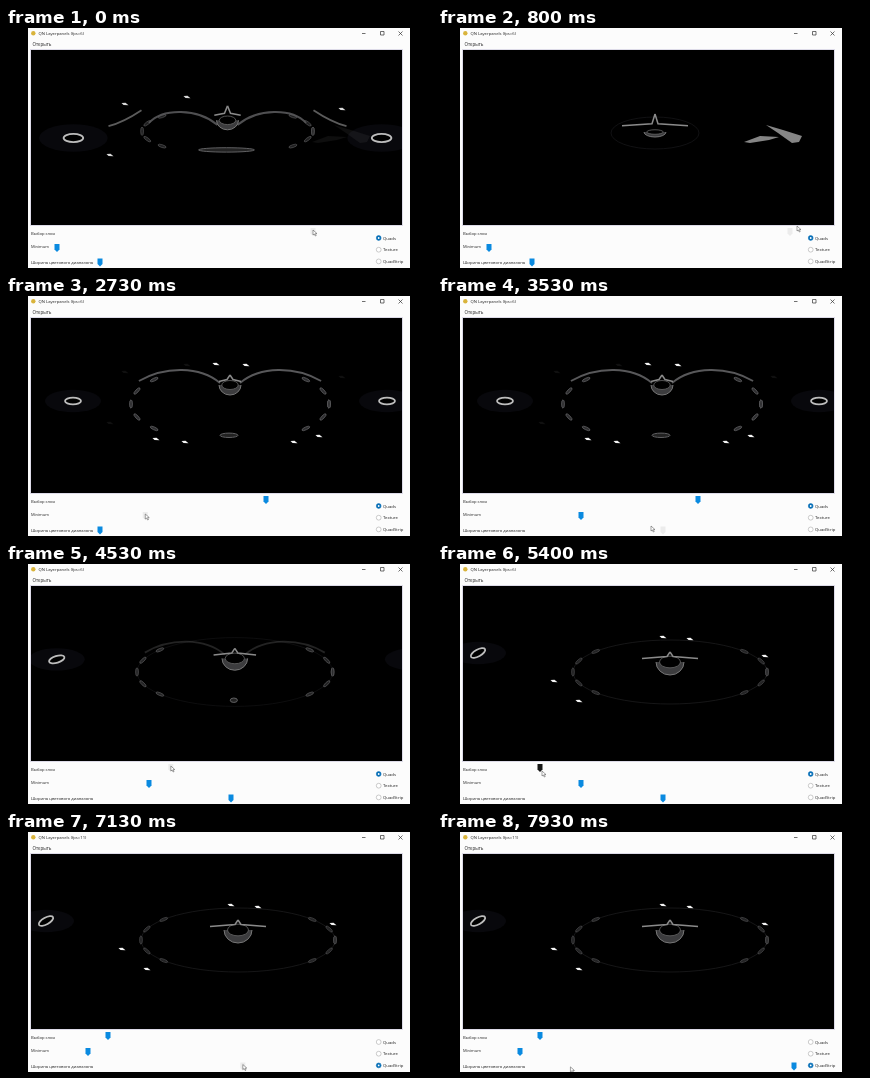
Write an HTML page with a canvas that moves like this. It is 426 px wide and 240 px high and loops after 8 s.

```html
<!DOCTYPE html>
<html lang="ru">
<head>
<meta charset="utf-8">
<style>
  html, body { margin: 0; width: 100%; height: 100%; overflow: hidden; background: #000; }
  canvas { display: block; width: 100vw; height: 100vh; }
</style>
</head>
<body>
<canvas id="stage" width="426" height="240"></canvas>
<script>
const ctx = document.getElementById('stage').getContext('2d');
const LOOP = 8000, STEP = 1000 / 15, RELEASE = 70;
const FONT = '"Open Sans", "Noto Sans", sans-serif';
const LAYER = 0, MINIMUM = 1, RANGE = 2;
const sliderTops = [200, 216, 230.5];
const SIDES = [-1, 1];

// Anatomy at four layer slider positions; every number is interpolated between them
const layers = [
  { at: 102, x: 232, chestY: 108, chestW: 97, chestH: 32, ribs: 0.65, arch: 0, outline: 1,
    spineY: 98, spineR: 14, depth: 13, spike: 10, wing: 28, sternum: 0,
    limbX: 40, limbY: 89, limbR: 8, tilt: -0.5, collar: 0, blade: 0,
    clips: [[225, 73], [252, 75], [116, 117], [141, 137], [327, 92]] },
  { at: 260, x: 224, chestY: 108, chestW: 99, chestH: 38, ribs: 1, arch: 1, outline: 0,
    spineY: 89, spineR: 11, depth: 10, spike: 10, wing: 11, sternum: 9,
    limbX: 67, limbY: 105, limbR: 8, tilt: 0, collar: 0, blade: 0,
    clips: [[210, 68], [240, 69], [150, 143], [179, 146], [288, 146], [313, 140]] },
  { at: 302, x: 222, chestY: 103, chestW: 90, chestH: 24, ribs: 0.8, arch: 1, outline: 0,
    spineY: 91, spineR: 11, depth: 10, spike: 14, wing: 11, sternum: 31,
    limbX: 76, limbY: 110, limbR: 10, tilt: 0, collar: 1, blade: 0,
    clips: [[119, 76], [181, 69], [336, 81], [104, 127]] },
  { at: 352, x: 217, chestY: 105, chestW: 44, chestH: 16, ribs: 0, arch: 0, outline: 0.8,
    spineY: 104, spineR: 11, depth: 5, spike: 18, wing: 33, sternum: 0,
    limbX: -10, limbY: 110, limbR: 8, tilt: 0, collar: 0, blade: 1,
    clips: [] }
];

const drag = (slider, start, end, from, to) => ({ slider, start, end, from, to });
const move = (time, x, y) => ({ stops: [{ time, x, y }] });

const actions = [
  drag(LAYER, 0, 780, 307, 352),
  move(800, 359, 198),
  drag(LAYER, 930, 1500, 352, 260),
  move(2000, 43, 224),
  drag(MINIMUM, 2250, 2800, 51, 143),
  drag(RANGE, 3050, 3480, 94, 225),
  move(3530, 213, 230),
  drag(LAYER, 4050, 4900, 260, 102),
  move(5400, 104, 207),
  move(5850, 372, 233),
  drag(MINIMUM, 6500, 6800, 143, 82),
  drag(RANGE, 7050, 7500, 225, 356),
  move(LOOP, 121, 235)
];

// A drag carries the pointer along with its thumb
const pointerStops = actions.flatMap(a => a.stops || [
  { time: a.start, x: a.from, y: sliderTops[a.slider] + 2 },
  { time: a.end, x: a.to, y: sliderTops[a.slider] + 2 }
]);

const clamp = v => Math.max(0, Math.min(1, v));
const mix = (a, b, k) => a + (b - a) * k;
const ease = (t, start, end) => {
  const k = clamp((t - start) / (end - start));
  return k * k * (3 - 2 * k);
};

function sliderAt(slider, t) {
  const own = actions.filter(a => a.slider === slider);
  const a = own.filter(d => d.start <= t).pop() || own[0];
  return { x: mix(a.from, a.to, ease(t, a.start, a.end)), held: t >= a.start && t < a.end + RELEASE };
}

function pointerAt(t) {
  const i = Math.max(1, pointerStops.findIndex(p => p.time >= t));
  const [a, b] = [pointerStops[i - 1], pointerStops[i]];
  const k = ease(t, a.time, b.time);
  return { x: mix(a.x, b.x, k), y: mix(a.y, b.y, k) };
}

function paint(path, fill, stroke, width = 1, alpha = 1) {
  ctx.globalAlpha = alpha;
  if (fill) {
    ctx.fillStyle = fill;
    ctx.fill(path);
  }
  if (stroke) {
    ctx.strokeStyle = stroke;
    ctx.lineWidth = width;
    ctx.stroke(path);
  }
  ctx.globalAlpha = 1;
}

const shape = d => new Path2D(d);

function ellipse(x, y, rx, ry, tilt = 0, from = 0, to = Math.PI * 2) {
  const path = new Path2D();
  path.ellipse(x, y, rx, ry, tilt, from, to);
  return path;
}

function rect(x, y, w, h, color) {
  ctx.fillStyle = color;
  ctx.fillRect(x, y, w, h);
}

function text(label, x, y, size = 4.3) {
  ctx.font = `${size}px ${FONT}`;
  ctx.fillStyle = '#222';
  ctx.fillText(label, x, y);
}

function bodyAt(position) {
  const next = Math.max(1, layers.findIndex(l => l.at >= position));
  const [a, b] = [layers[next - 1], layers[next]];
  const k = clamp((position - a.at) / (b.at - a.at));
  const body = {};
  for (const key in a) if (key !== 'clips') body[key] = mix(a[key], b[key], k);
  return body;
}

function drawRibs({ x, chestY, chestW, chestH, ribs, arch, outline }) {
  paint(ellipse(x, chestY, chestW, chestH), null, '#1c1c1e', 0.8, outline);
  for (let angle = 0; angle < Math.PI * 2; angle += Math.PI / 9) {
    const [c, s] = [Math.cos(angle), Math.sin(angle)];
    if (Math.abs(c) < 0.6) continue;
    const tangent = Math.atan2(chestH * c, -chestW * s);
    paint(ellipse(x + chestW * c, chestY + chestH * s, 4.2, 1.4, tangent), '#2c2c2e', '#606062', 0.8, ribs);
  }
  const top = chestY - chestH;
  for (const side of SIDES) {
    const at = distance => x + side * distance;
    paint(shape(`M${at(10)} ${top + 17}C${at(30)} ${top} ${at(65)} ${top} ${at(chestW * 0.92)} ${top + 15}`),
      null, '#58585a', 1.8, arch);
  }
}

function drawSpine({ x, spineY, spineR, depth, spike, wing }) {
  const tip = spineY - spike, root = spineY - spike * 0.35;
  paint(ellipse(x, spineY, spineR, depth, 0, 0, Math.PI), '#3c3c3e', '#777', 1);
  paint(ellipse(x, spineY, spineR * 0.75, depth * 0.45), '#000', '#666', 0.8);
  for (const side of SIDES) {
    paint(shape(`M${x} ${tip}L${x + side * 3} ${root - 2}L${x + side * wing} ${root}`), null, '#8a8a8a', 1.5);
  }
}

function drawLimbs({ x, limbX, limbY, limbR, tilt, collar, chestY }) {
  for (const side of SIDES) {
    const limb = x + side * (x - limbX);
    paint(ellipse(limb, limbY, limbR * 3.5, limbR * 1.4), '#08080c');
    paint(ellipse(limb, limbY, limbR, limbR * 0.42, tilt), '#000', '#bdbdbd', 1.8);
    paint(shape(`M${x + side * 119} ${chestY - 5}Q${x + side * 104} ${chestY - 9} ${x + side * 86} ${chestY - 21}`),
      null, '#666', 1.8, collar);
  }
}

function drawScan(position) {
  rect(24, 21, 373, 177, '#dddbe8');
  rect(25, 22, 371, 175, '#000');
  ctx.save();
  ctx.clip(ellipseFreeArea);
  const body = bodyAt(position);
  drawLimbs(body);
  drawRibs(body);
  drawSpine(body);
  if (body.sternum > 1) {
    paint(ellipse(body.x - 1, body.chestY + body.chestH * 0.85 - 1, body.sternum, 2.2), '#222', '#606062', 1);
  }
  paint(shape('M328 97L345 102L364 108L361 114L354 115L340 105ZM306 114L322 108L341 109L331 112L312 115Z'),
    '#858585', null, 0, body.blade);
  for (const { at, clips } of layers) {
    const strength = clamp(1 - Math.abs(position - at) / 45);
    for (const [x, y] of clips) {
      paint(shape(`M${x - 3.5} ${y - 1}l4 -.3l3 2.6l-5 -.3z`), '#f4f4f4', null, 0, strength);
    }
  }
  ctx.restore();
}
const ellipseFreeArea = shape('M25 22h371v175h-371z');

function drawThumb({ x, held }, top, pointer) {
  const hover = Math.abs(pointer.x - x) < 4 && pointer.y >= top && pointer.y < top + 8;
  const color = held ? '#ececec' : hover ? '#171717' : '#0a8ae0';
  paint(shape(`M${x - 2.5} ${top}h5v5.500l-2.500 2.500l-2.500 -2.500z`), color);
}

function drawRadio(label, y, selected) {
  const color = selected ? '#0870b8' : '#aaa';
  paint(ellipse(372.7, y, 2.4, 2.4), selected ? color : '#fff', color, 0.6);
  if (selected) paint(ellipse(372.7, y, 0.9, 0.9), '#fff');
  text(label, 377, y + 1.7);
}

function drawWindow(fps) {
  rect(0, 0, 426, 240, '#000');
  rect(22, 0, 382, 240, '#fcfcfc');
  paint(ellipse(27.3, 5.3, 2.2, 2.2), '#d9b43c');
  text(`QN Layerpanels (fps=${fps})`, 32.5, 7.2, 4.2);
  text('Открыть', 26.5, 17.8, 4.5);
  paint(shape('M356 5.500h3.500M374.500 3.500h3.500v3.500h-3.500zM392.500 3.500l4 4m0 -4l-4 4'), null, '#333', 0.7);
  text('Выбор слоя', 25, 207.3, 4.2);
  text('Minimum', 25, 220.3, 4);
  text('Ширина цветового диапазона', 25, 235.6, 4.2);
}

function drawPointer({ x, y }) {
  paint(shape(`M${x} ${y}v5l1.300 -1l1 2l.9 -.4l-.9 -2h1.700z`), '#fff', '#444', 0.5);
}

function render(t) {
  const sliders = sliderTops.map((_, i) => sliderAt(i, t));
  const pointer = pointerAt(t);
  const mode = t < 5900 ? 'Quads' : 'QuadStrip';
  drawWindow(t < 6900 ? 6 : 11);
  drawScan(sliders[LAYER].x);
  sliders.forEach((s, i) => drawThumb(s, sliderTops[i], pointer));
  ['Quads', 'Texture', 'QuadStrip'].forEach((label, i) =>
    drawRadio(label, 210 + i * 11.7, label === mode));
  drawPointer(pointer);
}

function tick() {
  const t = performance.now() % LOOP;
  render(Math.floor((t + 5) / STEP) * STEP % LOOP);
  requestAnimationFrame(tick);
}
tick();
</script>
</body>
</html>
```
